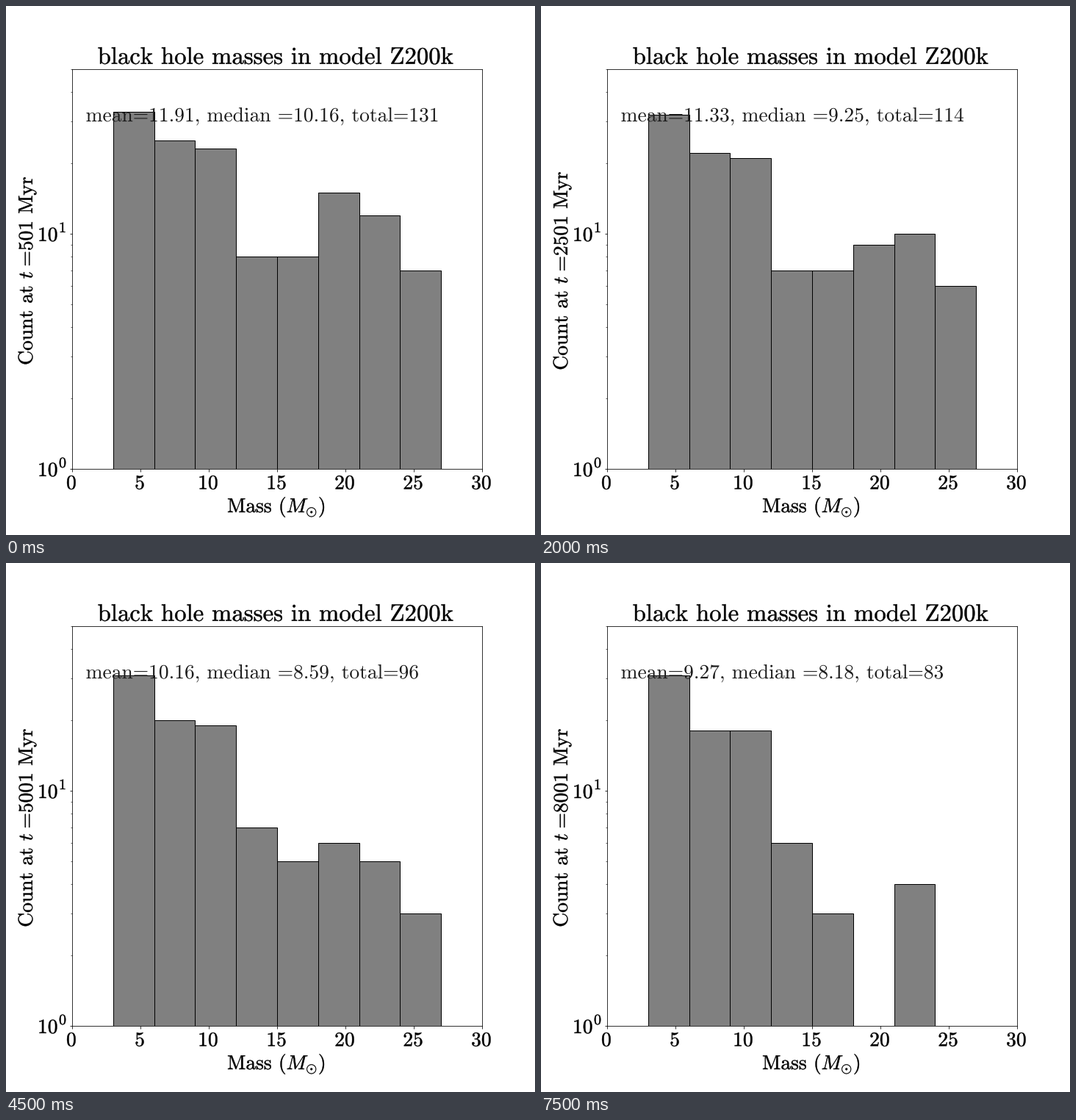
A matplotlib script for the animation above (8 s loop, 720 px wide and 720 px high).

```python
import numpy as np
import matplotlib.pyplot as plt
from matplotlib.animation import FuncAnimation
from matplotlib.patheffects import Stroke

SIZE = 720
STEPS = 16
STEP_MS = 500
GAP = r"\hspace{0.38}"

plt.rcParams["mathtext.fontset"] = "cm"


def track(*knots):
    """Piecewise linear function of the step, constant outside its knots."""
    steps, values = zip(*knots)
    return lambda step: np.interp(step, steps, values)


# Black holes left in each bin, 3 solar masses wide, from 3 upwards.
BINS = [
    track((0, 32.6), (11, 31)),
    track((0, 25), (4, 22.1), (15, 18)),
    track((0, 23), (7, 19.3), (15, 18)),
    track((0, 8.1), (15, 5.6)),
    track((0, 8), (11, 4.6), (13, 3)),
    track((1.5, 15), (4, 9), (7, 8), (11, 4), (13, 4), (15, 1)),
    track((2, 12), (6, 9), (7, 6), (13, 4)),
    track((2, 7), (4, 6), (5, 3), (10, 3), (11, 1)),
    track((10, 0), (11, 1)),
]
mean = track((2, 11.91), (4, 11.33), (7, 10.39), (11, 9.92), (15, 9.266))
median = track((0, 10.16), (2, 9.93), (4, 9.25), (7, 8.68), (11, 8.51),
               (13, 8.33), (15, 8.18))


def counts_at(step):
    return [round(float(n(step))) for n in BINS]


def roman(words):
    return GAP.join(rf"\text{{{w}}}" for w in words.split())


def count_label(step):
    time = 501 + 500 * step
    return rf"${roman('Count at')}{GAP}t\;{roman(f'={time} Myr')}$"


def stats_label(step):
    total = sum(counts_at(step))
    return "$%s$" % roman(f"mean={mean(step):.2f}, "
                          f"median ={median(step):.2f}, total={total}")


fig = plt.figure(figsize=(SIZE / 72, SIZE / 72), dpi=72, facecolor="white")
ax = fig.add_axes([0.125, 0.125, 0.775, 0.755])
ax.set_yscale("log")
ax.set_xlim(0, 30)
ax.set_ylim(1, 50)
ax.set_xticks(range(0, 31, 5))
ax.tick_params(which="both", labelleft=False, labelbottom=False)

bars = ax.bar(3 + 3 * np.arange(len(BINS)), np.ones(len(BINS)), width=3,
              bottom=0.5, align="edge", color="#808080", edgecolor="black",
              linewidth=1)


def put(x, y, text, size=27.5, ha="center", weight=0.45, color="black", **kw):
    """Place text with its baseline at pixel (x, y), y counted downwards."""
    return fig.text(x / SIZE, 1 - y / SIZE, text, fontsize=size, ha=ha,
                    va="baseline", color=color,
                    path_effects=[Stroke(linewidth=weight, foreground=color)],
                    **kw)


put(367.5, 79, "$%s$" % roman("black hole masses in model Z200k"), size=32.75)
put(368, 689, f"${roman('Mass')}{GAP}{roman('(')}M_{{\\odot}}{roman(')')}$")
for v in range(0, 31, 5):
    put(89.4 + 18.6 * v, 657.5, f"${v}$")
for power, y in enumerate((640, 320)):
    put(43, y, "$10$", ha="left")
    put(72, y - 12, f"${power}$", size=20, ha="left")

count_text = put(36, 360, count_label(0), rotation=90, rotation_mode="anchor")
stats_text = put(108.6, 157.3, stats_label(0), ha="left", weight=0,
                 color="#1c1c1c")


def update(step):
    for bar, n in zip(bars, counts_at(step)):
        bar.set_visible(n > 1)
        bar.set_height(n - 0.5)
    count_text.set_text(count_label(step))
    stats_text.set_text(stats_label(step))
    return [*bars, count_text, stats_text]


anim = FuncAnimation(fig, update, frames=STEPS, interval=STEP_MS, repeat=True)
plt.show()
```
